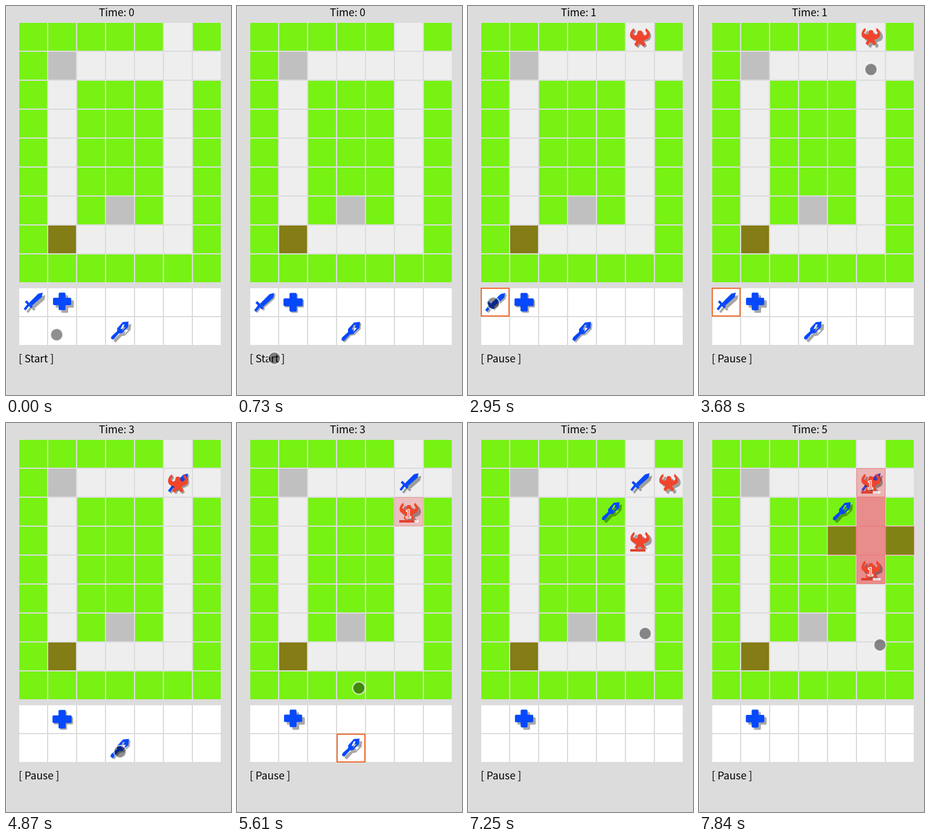
Animation of 373x645 px, one loop 7.99 s. Source, as an HTML page:

```html
<!DOCTYPE html>
<html lang="en">
<head>
<meta charset="utf-8">
<title>Grid defence</title>
<style>
  html, body { margin: 0; width: 100%; height: 100%; overflow: hidden; background: #dcdcdc; }
  svg { display: block; width: 373px; height: 645px; }
  text { font-family: "Noto Sans CJK JP", "Noto Sans CJK", "Noto Sans", sans-serif; font-size: 17.3px; fill: #000; }
  .shade { color: #000; opacity: .34; }
  .item { color: #0648fb; }
  .enemy { color: #f0452c; }
  .pick { fill: none; stroke: #ee6f32; stroke-width: 2; }
  .damage { fill: #ee6a5e; stroke: #fff; stroke-width: 2.4; paint-order: stroke; text-anchor: middle; font-size: 18px; }
</style>
</head>
<body>
<svg id="stage" viewBox="0 0 373 645">
  <defs>
    <clipPath id="boardClip"><rect x="22" y="28" width="334" height="430"/></clipPath>
    <g id="sword" fill="currentColor" stroke="currentColor" stroke-width="0">
      <path d="M17-16L9-14L-7 2L-2 7L15-8Z"/>
      <path d="M-13-1L-2 10M-8 5L-15 14" stroke-width="4.2" fill="none"/>
    </g>
    <path id="plus" fill="currentColor" d="M-4-16H4Q6-16 6-14V-7H14Q16-7 16-5V4Q16 6 14 6H6V13Q6 15 4 15H-4Q-6 15-6 13V6H-14Q-16 6-16 4V-5Q-16-7-14-7H-6V-14Q-6-16-4-16Z"/>
    <path id="wand" fill="currentColor" fill-rule="evenodd"
      d="M-5-4L5-15L15-16L14-6L4 4L-2 5L-12 16L-16 14L-15 10L-5 1ZM5-11L1-3H5L3 2L10-6H6L8-11Z"/>
    <path id="imp" fill="currentColor"
      d="M-10-16C-17-11-19-2-13 2L-6 5C-6 8-9 8-9 12L-5 15L-2 10H2L5 15L9 12C9 8 6 8 6 5L13 2C19-2 17-11 10-16L9-12L12-7L9-4L5-5L4-10L2-12H-2L-4-10L-5-5L-9-4L-12-7L-9-12Z"/>
  </defs>
  <rect width="373" height="645" fill="#dcdcdc"/>
  <rect width="1" height="645" fill="#ececec"/>
  <g id="tiles"></g>
  <text id="clock" x="183.5" y="17" text-anchor="middle"></text>
  <text id="button" x="21" y="591"></text>
  <g id="scene"></g>
</svg>
<script>
const LOOP = 7990, STEP = 148, LAG = 18;
const TICK = 1186, FIRST_TICK = 2494;
const START = 1180;
const SWORD = { pick: 2250, drop: 4000 }, WAND = { pick: 5300, drop: 6060 };

const $ = id => document.getElementById(id);
const cell = (col, row) => [22 + 48 * col, 28 + 48 * row];
const mid = (col, row) => cell(col, row).map(v => v + 23);
const slot = (col, row) => [45 + 48 * col, 491 + 48 * row];
const clamp = v => Math.max(0, Math.min(1, v));
const smooth = v => { v = clamp(v); return v * v * (3 - 2 * v); };
const lerp = (a, b, k) => a + (b - a) * k;
const tickAt = n => FIRST_TICK + (n - 1) * TICK;
const rect = (x, y, w, h, rest) => `<rect x="${x}" y="${y}" width="${w}" height="${h}" ${rest}/>`;

// g grass, . path, s stone, b base
const MAP = ["ggggg.g", "gs.....", "g.ggg.g", "g.ggg.g", "g.ggg.g", "g.ggg.g", "g.gsg.g", "gb....g", "ggggggg"];
const COLORS = { g: "#77f213", ".": "#eee", s: "#c0c0c0", b: "#847c14" };

function drawTiles() {
  let out = "";
  MAP.forEach((line, row) => [...line].forEach((kind, col) => {
    out += rect(...cell(col, row), 46, 46, `fill="${COLORS[kind]}"`);
  }));
  for (let i = 0; i < 14; i++)
    out += rect(22 + 48 * (i % 7), 468 + 48 * Math.floor(i / 7), 46, 46, 'fill="#fff"');
  $("tiles").innerHTML = out;
}

// Pointer stops: time, x, y
const POINTER = [
  [0, 84, 545], [600, 62, 584], [1250, 62, 584], [1628, 55, 497], [1850, 42, 493],
  [2960, 42, 493], [3600, 289, 99], [3750, 289, 99], [3900, 299, 102], [4100, 297, 100],
  [4640, 190, 548], [4884, 189, 545], [5180, 191, 559], [5420, 191, 552],
  [6000, 230, 156], [6600, 230, 156], [7400, 300, 368], [LOOP, 300, 368]
];

function pointer(t) {
  const i = Math.max(1, POINTER.findIndex(p => p[0] > t));
  const [a, b] = [POINTER[i - 1], POINTER[i]];
  const k = smooth((t - a[0]) / (b[0] - a[0]));
  return `<circle cx="${lerp(a[1], b[1], k)}" cy="${lerp(a[2], b[2], k)}" r="10.2"
    fill="#000" fill-opacity=".44" stroke="#fff" stroke-opacity=".65" stroke-width="2"/>`;
}

// Hovering sprites shrink, rise and cast a longer shadow
function sprite(id, kind, [x, y], t) {
  const lift = .5 + .5 * Math.cos(2 * Math.PI * (t / 1900 + .05));
  const size = lerp(1, .94, lift), dx = lerp(2, 4.5, lift);
  const put = (cls, px, py) =>
    `<use href="#${id}" class="${cls}" transform="translate(${px} ${py}) scale(${size})"/>`;
  const top = y + lerp(.8, -.8, lift);
  return put("shade", x + dx, top + dx) + put(kind, x, top);
}

const HITS = [
  { tick: 3, cells: [[5, 2]], alpha: .3 },
  { tick: 5, cells: [[5, 1]], alpha: .28 },
  { tick: 5, cells: [[5, 2], [5, 3], [5, 4], [4, 3], [6, 3]], alpha: .46 }
];
const hitAge = (n, t) => t - tickAt(n) - 450;
const glow = age => age < 0 || age > 600 ? 0 : Math.min(1, (600 - age) / 400);

function flashes(t) {
  return HITS.map(hit => {
    const power = glow(hitAge(hit.tick, t));
    if (!power) return "";
    return `<g opacity="${power}">` + hit.cells.map(([c, r]) => {
      const fill = MAP[r][c] === "g" ? "#890014" : "#e11a1a";
      const [x, y] = cell(c, r);
      return rect(x - .5, y - .5, 47, 47,
        `fill="${fill}" fill-opacity="${hit.alpha}" stroke="#f0706a" stroke-opacity=".7"`);
    }).join("") + "</g>";
  }).join("");
}

const ENEMIES = [
  { born: 1, from: [5, -1], dir: [0, 1], hits: [[3, .78], [5, .6]] },
  { born: 4, from: [7, 1], dir: [-1, 0], hits: [[5, .6]] }
];

function enemy({ born, from, dir, hits }, t) {
  if (t < tickAt(born)) return "";
  const n = Math.floor((t - tickAt(born)) / TICK);
  const walked = n + smooth((t - tickAt(born + n)) / 400);
  const [x, y] = mid(from[0] + dir[0] * walked, from[1] + dir[1] * walked);
  let out = sprite("imp", "enemy", [x, y + 1], t);
  const taken = hits.filter(([tick]) => hitAge(tick, t) >= 0);
  if (taken.length) {
    const [tick, health] = taken[taken.length - 1];
    out += rect(x - 16, y + 14, 32, 4, 'fill="#fff" fill-opacity=".75"');
    out += rect(x - 16, y + 14, 32 * health, 4, 'fill="#e23f2c"');
    if (hitAge(tick, t) < 600) out += `<text class="damage" x="${x - 1}" y="${y + 10}">1</text>`;
  }
  return out;
}

function tool(id, state, home, goal, t) {
  const placed = t >= state.drop;
  let out = sprite(id, "item", placed ? goal : home, t);
  if (t >= state.pick && !placed) out += rect(home[0] - 23, home[1] - 23, 46, 46, 'class="pick"');
  return out;
}

function render(t) {
  const count = Math.max(0, Math.floor((t - FIRST_TICK) / TICK) + 1);
  $("clock").textContent = "Time: " + count;
  $("button").textContent = t < START ? "[ Start ]" : "[ Pause ]";
  $("scene").innerHTML =
    tool("sword", SWORD, slot(0, 0), mid(5, 1), t) +
    sprite("plus", "item", slot(1, 0), t) +
    tool("wand", WAND, slot(3, 1), mid(4, 2), t) +
    flashes(t) +
    `<g clip-path="url(#boardClip)">${ENEMIES.map(e => enemy(e, t)).join("")}</g>` +
    pointer(t);
}

// The picture advances in even steps
let shown = -1;
function loop() {
  const step = Math.floor((performance.now() % LOOP + LAG) / STEP);
  if (step !== shown) render((shown = step) * STEP);
  requestAnimationFrame(loop);
}

drawTiles();
loop();
</script>
</body>
</html>
```
